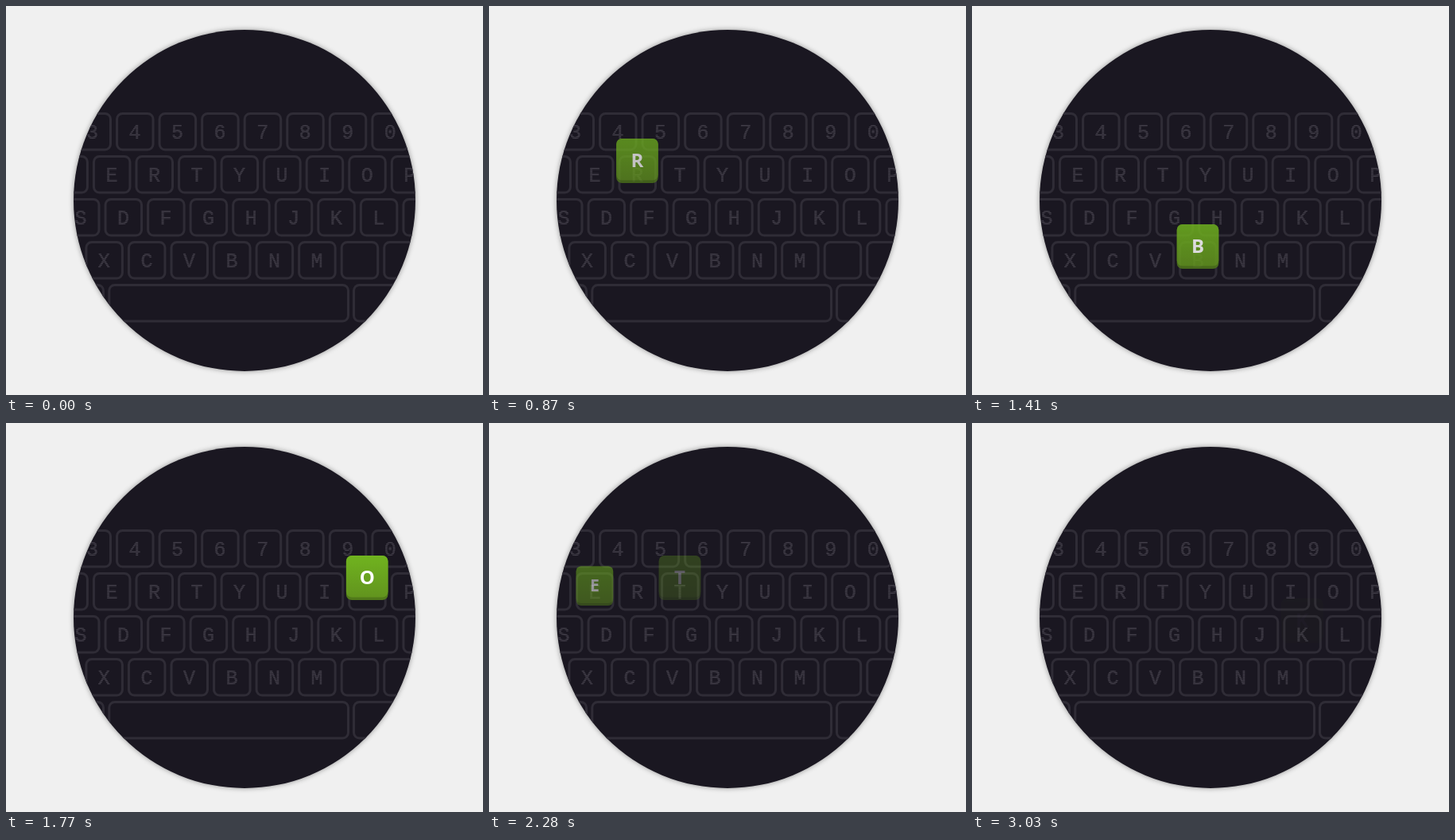
These frames come from a looping animation (600 by 490 pixels, 3.66 s). An HTML page:

```html
<!DOCTYPE html>
<html lang="en">
<head>
<meta charset="utf-8">
<title>Typing keyboard</title>
<style>
  html, body { margin: 0; width: 100%; height: 100%; overflow: hidden; background: #f0f0f0; }
  svg { display: block; width: 600px; height: 490px; }
  .disc { fill: #1a1721; filter: drop-shadow(0 0 3px rgba(0, 0, 0, .4)); }
  .cap { fill: none; stroke: #2f2c36; stroke-width: 3; }
  .label { font: 25px "Liberation Mono", monospace; text-anchor: middle; fill: url(#dots); stroke: url(#dots); stroke-width: .5; }
  .lit { font: bold 24px "Open Sans", sans-serif; text-anchor: middle; fill: #fff; }
</style>
</head>
<body>
<svg viewBox="0 0 600 490">
  <defs>
    <clipPath id="round"><circle cx="300" cy="245" r="215"/></clipPath>
    <linearGradient id="green" x2="0" y2="1">
      <stop stop-color="#70b31f"/>
      <stop offset="1" stop-color="#62941e"/>
    </linearGradient>
    <pattern id="dots" width="2" height="2" patternUnits="userSpaceOnUse">
      <rect width="2" height="2" fill="#2a2731"/>
      <rect width="2" height="1" fill="#433f4a"/>
    </pattern>
  </defs>
  <circle class="disc" cx="300" cy="245" r="215"/>
  <g id="board" clip-path="url(#round)"></g>
  <g id="pressed"></g>
</svg>
<script>
const PITCH = 53.55, ROW = 54, TOP = 134, SIZE = 48.5;
const LOOP = 3660, STEP = 30, FIRST = 630, LAST = 3030;
const RISE = 100, FADE_AT = 215, FADE = 330;

// Left edge of the first key and the labels of each row
const rows = [
  [84.5, "34567890"],
  [55.4, " ERTYUIOP"],
  [70, "SDFGHJKL "],
  [99.4, "XCVBNM  "]
];
const presses = [["R", 594], ["O", 890], ["B", 1150], ["O", 1580], ["T", 1922], ["E", 2228], ["K", 2500]];

const board = document.getElementById("board");
const pressed = document.getElementById("pressed");
const centers = {};

function add(parent, tag, attrs, text) {
  const el = document.createElementNS("http://www.w3.org/2000/svg", tag);
  for (const name in attrs) el.setAttribute(name, attrs[name]);
  if (text) el.textContent = text;
  return parent.appendChild(el);
}

function drawCap(x, y, width) {
  add(board, "rect", { class: "cap", x: x + 1.5, y: y + 1.5, width: width - 3, height: SIZE - 3, rx: 7 });
}

rows.forEach(([left, labels], r) => {
  const y = TOP + r * ROW;
  [...labels].forEach((label, i) => {
    const x = left + i * PITCH, cx = x + SIZE / 2 - .3;
    drawCap(x, y, SIZE);
    if (label === " ") return;
    centers[label] = [cx, y + SIZE / 2];
    add(board, "text", { class: "label", x: cx, y: y + 32.7 }, label);
  });
});
drawCap(75, 350, 49);
drawCap(128.3, 350, 303.7);
drawCap(436, 350, 100);

const keys = presses.map(([label, start], i) => {
  const el = add(pressed, "g", { opacity: 0 });
  add(el, "rect", { x: -26.3, y: -28, width: 52.6, height: 56, rx: 7, fill: "#50791a" });
  add(el, "rect", { x: -26.3, y: -28, width: 52.6, height: 52.5, rx: 7, fill: "url(#green)" });
  add(el, "text", { class: "lit", x: 0, y: 7.8 }, label);
  const [x, y] = centers[label];
  return { el, start, x, y: y - 17.2, floor: i === presses.length - 1 ? .015 : 0 };
});

const clamp = v => Math.min(1, Math.max(0, v));

// cubic-bezier(.25, .1, .25, 1)
function ease(x) {
  let lo = 0, hi = 1, u = .5;
  for (let i = 0; i < 20; i++) {
    u = (lo + hi) / 2;
    const bx = .75 * u * (1 - u) + u ** 3;
    if (bx < x) lo = u; else hi = u;
  }
  return .3 * u * (1 - u) ** 2 + 3 * u * u * (1 - u) + u ** 3;
}

function draw(time) {
  const t = time < FIRST ? 0 : Math.min(time, LAST);
  for (const key of keys) {
    const age = t - key.start;
    const p = clamp(age / RISE);
    const fade = 1 - ease(clamp((age - FADE_AT) / FADE));
    const alpha = age <= 0 ? 0 : p * Math.max(key.floor, fade);
    const scale = .76 + .24 * p;
    const y = key.y + 14 * (1 - p * p);
    key.el.setAttribute("opacity", alpha < .005 ? 0 : alpha.toFixed(3));
    key.el.setAttribute("transform", `translate(${key.x} ${y}) scale(${scale})`);
  }
}

const begin = performance.now();
function tick() {
  const time = (performance.now() - begin) % LOOP;
  draw(Math.floor(time / STEP) * STEP);
  requestAnimationFrame(tick);
}
tick();
</script>
</body>
</html>
```
